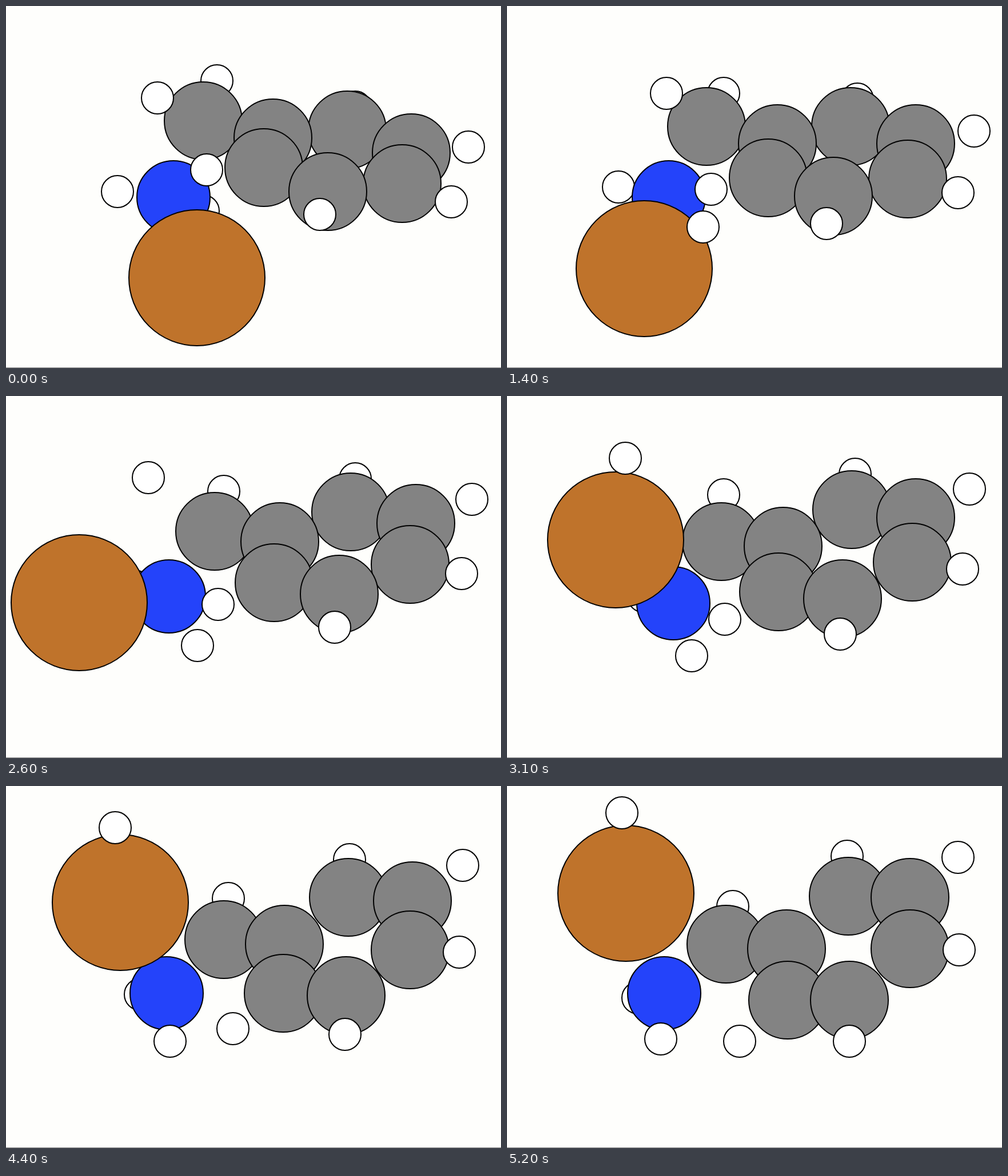
Recreate the animation shown at these times as an HTML page with a canvas. Size 866 by 634 pixels, loop 5.3 s.

```html
<!DOCTYPE html>
<html lang="en">
<head>
<meta charset="utf-8">
<title>Molecule</title>
<style>
html, body { margin: 0; width: 100%; height: 100%; overflow: hidden; background: #fefefc; }
canvas { display: block; }
</style>
</head>
<body>
<canvas id="stage" width="866" height="634"></canvas>
<script>
const ctx = document.getElementById('stage').getContext('2d');
const LOOP = 5300, STEP = 100, END = LOOP - STEP, BOND = 1.78;

const KINDS = {
  H: { r: 28, fill: '#ffffff' },
  C: { r: 68, fill: '#838383' },
  N: { r: 64, fill: '#2443fa' },
  X: { r: 119, fill: '#bf732b' }
};

const smoothstep = (t, from, to) => {
  const u = Math.min(1, Math.max(0, (t - from) / (to - from)));
  return u * u * (3 - 2 * u);
};
const both = fn => [fn(0), fn(1)];

// Steady drift, a quick rearrangement in the middle, and the two blended.
const drift = t => t / END;
const hop = t => smoothstep(t, 2000, 3100);
const progress = t => 0.82 * drift(t) + 0.18 * hop(t);
const pulse = t => Math.sin(Math.PI * drift(t)) ** 2;

// Straight move from a to b, bowed by the given amount halfway.
const bow = (a, b, bend) => t => {
  const w = progress(t);
  return both(i => a[i] + (b[i] - a[i]) * w + bend[i] * 4 * w * (1 - w));
};

// Base position plus an offset that drifts steadily and shifts with the hop.
const follow = (base, offset, slide = [0, 0], shift = [0, 0]) => t => {
  const p = base(t);
  return both(i => p[i] + offset[i] + slide[i] * drift(t) + shift[i] * hop(t));
};

const orbit = (base, degrees, radius) => t => {
  const [x, y] = base(t), a = degrees(t) * Math.PI / 180;
  return [x + radius(t) * Math.cos(a), y + radius(t) * Math.sin(a)];
};

// Smooth path through [time, x, y] points, without overshoot.
function through(keys) {
  const secant = (i, k) => (keys[i + 1][k] - keys[i][k]) / (keys[i + 1][0] - keys[i][0]);
  const slope = (i, k) => {
    if (i === 0) return secant(0, k);
    if (i === keys.length - 1) return secant(i - 1, k);
    const a = secant(i - 1, k), b = secant(i, k);
    return a * b > 0 ? 2 * a * b / (a + b) : 0;
  };
  return t => {
    let i = 0;
    while (i < keys.length - 2 && t >= keys[i + 1][0]) i++;
    const h = keys[i + 1][0] - keys[i][0], u = (t - keys[i][0]) / h, v = 1 - u;
    return [1, 2].map(k =>
      keys[i][k] * (1 + 2 * u) * v * v + slope(i, k) * h * u * v * v +
      keys[i + 1][k] * u * u * (3 - 2 * u) - slope(i + 1, k) * h * u * u * v);
  };
}

// The six-membered ring is a flat hexagon: a centre and two corner vectors.
const centre = bow([580, 270.9], [597.6, 284.8], [4, -3]);
const left = bow([-112.3, -40.2], [-108.2, -0.7], [-4, 0]);
const right = bow([129.2, -13], [107, -90.2], [7, 0]);
const ring = (a, b, scale = 1) => t => {
  const c = centre(t), p = left(t), q = right(t);
  return both(i => c[i] + scale * (a * p[i] + b * q[i]));
};

const methylene = follow(ring(1, 0), [-122.5, -29], [0, 0], [16, 21]);
const nitrogen = follow(() => [293, 335], [0, 0], [-39, 0], [21, 27]);
const amine = orbit(nitrogen,
  t => 25 + 69 * progress(t),
  t => 57 + 25 * drift(t) + 30 * pulse(t));
const backAmine = orbit(nitrogen,
  t => 186 - 17 * drift(t) + 18 * pulse(t),
  t => 98.5 - 52 * smoothstep(t, 500, 3800));

const leaving = through([
  [0, 334, 476], [800, 288, 472], [2000, 186, 434], [2600, 128, 362],
  [3100, 190, 252], [3800, 194, 220], [END, 208, 188]
]);
const transferred = through([
  [0, 265, 161], [2000, 281, 149], [3000, 215, 133],
  [3100, 207, 109], [3800, 187, 91], [END, 201, 47]
]);

// Back to front.
const atoms = [
  ['H', follow(methylene, [24, -70], [20, 45], [-32, -40])],
  ['H', ring(1, 1, BOND)],
  ['H', backAmine],
  ['H', amine, t => t < 1400],
  ['N', nitrogen],
  ['C', methylene],
  ['C', ring(1, 1)],
  ['C', ring(1, 0)],
  ['C', ring(0, 1)],
  ['C', ring(0, -1)],
  ['C', ring(-1, 0)],
  ['C', ring(-1, -1)],
  ['X', leaving],
  ['H', transferred],
  ['H', follow(ring(0, -1, BOND), [0, -7], [0, 8])],
  ['H', ring(-1, -1, BOND)],
  ['H', ring(-1, 0, BOND)],
  ['H', ring(0, 1, BOND)],
  ['H', amine, t => t >= 1400]
];

// Centres sit on a two-pixel grid: even for odd radii, odd for even ones.
const snap = (v, r) => r % 2 ? 2 * Math.round(v / 2) : 2 * Math.floor(v / 2) + 1;

function drawAtom(kind, [x, y]) {
  const { r, fill } = KINDS[kind];
  ctx.beginPath();
  ctx.arc(snap(x, r), snap(y, r), r, 0, 2 * Math.PI);
  ctx.fillStyle = fill;
  ctx.fill();
  ctx.stroke();
}

function draw(t) {
  ctx.fillStyle = '#fefefc';
  ctx.fillRect(0, 0, 866, 634);
  ctx.fillStyle = '#838383';
  ctx.fillRect(0, 633, 866, 1);
  ctx.lineWidth = 2;
  ctx.strokeStyle = '#000';
  for (const [kind, place, visible] of atoms) {
    if (!visible || visible(t)) drawAtom(kind, place(t));
  }
}

let start = null;
function tick(now) {
  if (start === null) start = now;
  const t = Math.max(0, now - start) % LOOP;
  draw(Math.floor(t / STEP) * STEP);
  requestAnimationFrame(tick);
}
draw(0);
requestAnimationFrame(tick);
</script>
</body>
</html>
```
